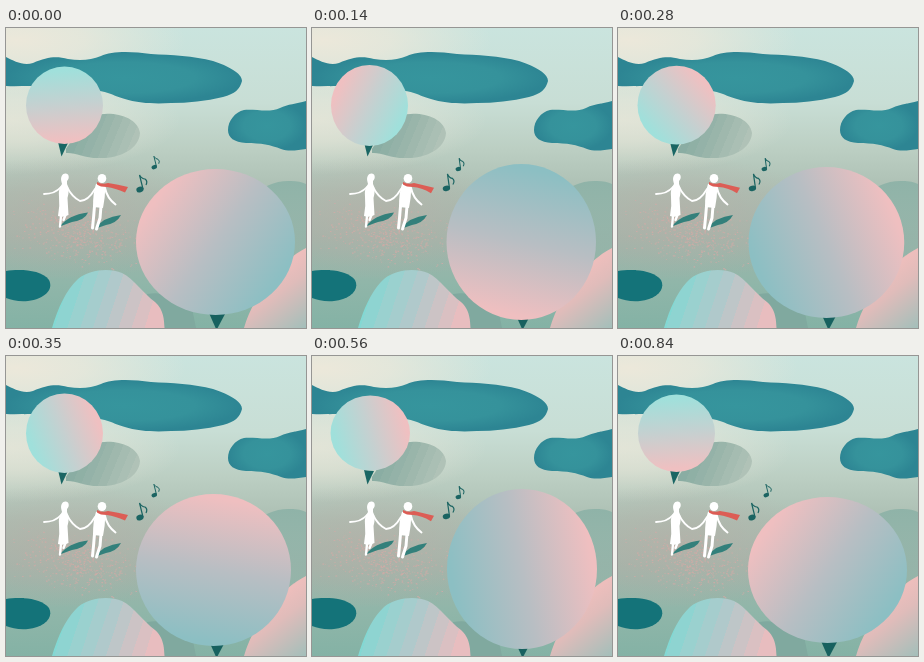
An HTML page that plays this animation: 300x300 px, repeating every 0.91 s.

```html
<!DOCTYPE html>
<html lang="en">
<head>
<meta charset="utf-8">
<title>Walk among the trees</title>
<style>
html, body { margin: 0; width: 100%; height: 100%; overflow: hidden; background: #b5c9bd; }
svg { display: block; width: 100vw; height: 100vh; }
</style>
</head>
<body>
<svg viewBox="0 0 300 300" preserveAspectRatio="none">
  <defs>
    <linearGradient id="land" x1="0" y1="0" x2="0" y2="1">
      <stop offset="0" stop-color="#cae4de"/>
      <stop offset=".25" stop-color="#c8ded5"/>
      <stop offset=".4" stop-color="#bccfc3"/>
      <stop offset=".55" stop-color="#abbeb2"/>
      <stop offset=".7" stop-color="#a0b5aa"/>
      <stop offset=".85" stop-color="#90b6a9"/>
      <stop offset="1" stop-color="#84b2a5"/>
    </linearGradient>
    <radialGradient id="cream">
      <stop offset="0" stop-color="#ece8da"/>
      <stop offset=".4" stop-color="#ece8da" stop-opacity=".75"/>
      <stop offset="1" stop-color="#ece8da" stop-opacity="0"/>
    </radialGradient>
    <radialGradient id="blush">
      <stop offset="0" stop-color="#b9aea6" stop-opacity=".65"/>
      <stop offset="1" stop-color="#b9aea6" stop-opacity="0"/>
    </radialGradient>
    <radialGradient id="lake">
      <stop offset="0" stop-color="#36959d"/>
      <stop offset=".6" stop-color="#35929b"/>
      <stop offset="1" stop-color="#2d8593"/>
    </radialGradient>
    <linearGradient id="hill" x1="0" y1="0" x2="0" y2="1">
      <stop offset="0" stop-color="#8fb3a8"/>
      <stop offset="1" stop-color="#8fb3a8" stop-opacity="0"/>
    </linearGradient>
    <linearGradient id="shade" x1="0" y1=".35" x2="1" y2=".6"></linearGradient>
    <linearGradient id="front" x1="0" y1=".45" x2="1" y2=".62"></linearGradient>
    <linearGradient id="side" gradientUnits="userSpaceOnUse" x1="262" y1="250" x2="300" y2="300">
      <stop offset="0" stop-color="#edbebc"/>
      <stop offset=".3" stop-color="#e0bcba"/>
      <stop offset="1" stop-color="#a3bfba"/>
    </linearGradient>
    <linearGradient id="bigFill">
      <stop offset=".03" stop-color="#8cbfc3"/>
      <stop offset=".5" stop-color="#b8bec3"/>
      <stop offset=".97" stop-color="#efbfc0"/>
    </linearGradient>
    <linearGradient id="smallFill">
      <stop offset=".05" stop-color="#a0e0db"/>
      <stop offset=".5" stop-color="#c6d0d0"/>
      <stop offset=".95" stop-color="#efc0c1"/>
    </linearGradient>
  </defs>

  <rect width="300" height="300" fill="url(#land)"/>
  <ellipse cx="10" cy="12" rx="170" ry="55" fill="url(#cream)"/>
  <ellipse cx="5" cy="92" rx="170" ry="55" fill="url(#cream)" opacity=".75"/>
  <ellipse cx="60" cy="190" rx="150" ry="62" fill="url(#blush)"/>
  <path d="M245 300V170Q262 152 285 153Q294 153 300 156V300Z" fill="url(#hill)"/>
  <path id="dots" fill="#d5aaa6" opacity=".75"/>

  <path fill="url(#lake)" d="M0 29C8 33 17 38 27 35C41 29 50 28 62 31C75 33 85 32 95 28C105 23 125 23 145 26C165 27 188 28 207 33C222 38 236 45 236 53C234 61 229 66 217 69C200 73 182 75 165 75C132 77 117 71 105 66C90 60 62 61 42 59C25 57 12 59 0 58Z"/>
  <path fill="url(#lake)" d="M300 73C290 76 282 76 274 80C264 85 250 81 238 82C229 84 222 93 222 102C222 110 228 114 240 115C255 115 265 117 275 121C283 124 292 122 300 121Z"/>
  <path fill="#147379" d="M0 243C12 241 35 241 43 252C48 262 38 271 22 273C13 274 6 272 0 270Z"/>

  <path fill="url(#shade)" d="M60 121C68 110 74 93 88 88C104 82 132 88 134 105C133 122 112 131 92 130C78 130 68 124 60 125Z"/>
  <path fill="#1a6664" d="M52 114L62 115L55.500 128.500Z"/>
  <ellipse id="small" fill="url(#smallFill)"/>

  <g fill="#33807b">
    <path d="M54 198.500Q62 187 82 184.500Q79 192 66 194Q60 196 54 198.500Z"/>
    <path d="M89 201Q97 189 115 187Q111 195 100 197Q94 199 89 201Z"/>
  </g>
  <g fill="#fff" stroke="#fff" stroke-linecap="round" stroke-linejoin="round">
    <path stroke="none" d="M55.500 154C54 148 57 145 60 145.500C63.500 146 63.500 151 61 153L61 156Q64 161 61.500 170L62.500 187Q57 190 52 188Q54 178 53 169Q52 161 56 156Z"/>
    <path fill="none" stroke-width="1.800" d="M55 159Q49 166 38 166M61 159Q66 169 74 173Q82 173 89 161"/>
    <path fill="none" stroke-width="2.400" d="M55 188L54 198.500M59.500 187L57.500 192"/>
    <ellipse stroke="none" cx="96" cy="150.500" rx="4.300" ry="4.500"/>
    <path stroke="none" d="M90 156Q95 154 99.500 158Q99 170 97 180L87 179Q87 164 90 156Z"/>
    <path fill="none" stroke-width="2" d="M99 160Q101 170 109.500 176.500"/>
    <path fill="none" stroke-width="3" d="M88.500 178L87.500 190L86.500 200M95 178L94 190L90.500 201"/>
  </g>
  <path id="scarf" fill="#dc5d55"/>

  <g fill="#1b6462" stroke="#1b6462">
    <g id="noteA"><ellipse cx="-1" cy="5.500" rx="3.700" ry="2.800" transform="rotate(-18 -1 5.500)" stroke="none"/><path fill="none" stroke-width="1.200" d="M2 5L-1.500 -9Q1 -5 4 -5Q7 -3 5 1"/></g>
    <g id="noteB"><ellipse cx="-1" cy="5.500" rx="3.700" ry="2.800" transform="rotate(-18 -1 5.500)" stroke="none"/><path fill="none" stroke-width="1.300" d="M2 5L-1.500 -9Q1 -5 4 -5Q7 -3 5 1"/></g>
  </g>

  <path fill="#80a99f" d="M141 266Q165 262 186 280L190 300H140Z"/>
  <path fill="url(#front)" d="M46 300C52 280 60 262 72 251C84 241 104 240 116 245C128 251 137 265 149 274C158 282 158 292 158.500 300Z"/>
  <path fill="url(#side)" d="M300 220C288 226 276 236 266 249C254 263 243 282 238 300H300Z"/>
  <path fill="#17615f" d="M203 285L219 286L210.500 302Z"/>
  <ellipse id="big" fill="url(#bigFill)"/>
</svg>
<script>
const $ = id => document.getElementById(id);
const STEP = 70, TICKS = 13;

// Rows: tick, gradient angle, left, top, right, bottom
const bigKeys = [
  [0, 146, 130, 141, 289, 287],
  [2, 258, 134.5, 136, 284, 292],
  [3, 325, 131, 140, 287.5, 290],
  [5, 440, 130, 138, 285, 290],
  [8, 732, 135, 133, 285, 293],
  [10, 785, 133, 137, 285, 290.5],
  [12, 866, 130, 141, 289, 287]
];
const smallKeys = [
  [0, 273, 20, 38.5, 97, 116],
  [2, 152, 19, 37, 96, 118],
  [3, 62, 19, 38, 98.5, 116],
  [5, 22, 20, 37.5, 97, 117],
  [8, -345, 18.5, 39.5, 98, 114.5],
  [10, -385, 20.5, 38, 98, 117],
  [12, -447, 20, 38.5, 97, 116]
];

function sample(keys, tick) {
  const i = Math.max(1, keys.findIndex(k => k[0] >= tick));
  const a = keys[i - 1], b = keys[i];
  const u = (tick - a[0]) / (b[0] - a[0]);
  return a.map((v, j) => v + (b[j] - v) * u);
}

function set(el, attrs) {
  for (const k in attrs) el.setAttribute(k, attrs[k]);
}

function crown(name, keys, tick) {
  const [, angle, l, t, r, b] = sample(keys, tick);
  set($(name), { cx: (l + r) / 2, cy: (t + b) / 2, rx: (r - l) / 2, ry: (b - t) / 2 });
  $(name + 'Fill').setAttribute('gradientTransform', `rotate(${-angle} .5 .5)`);
}

// Soft stripes: each colour holds for one band
function bands(id, from, mid, to, n) {
  const mix = (a, b, u) => a.map((v, i) => Math.round(v + (b[i] - v) * u));
  let out = '';
  for (let i = 0; i < n; i++) {
    const u = i / (n - 1) * 2;
    const c = `rgb(${u < 1 ? mix(from, mid, u) : mix(mid, to, u - 1)})`;
    out += `<stop offset="${i / n}" stop-color="${c}"/><stop offset="${(i + 1) / n}" stop-color="${c}"/>`;
  }
  $(id).innerHTML = out;
}

function scatter() {
  let seed = 11, d = '';
  const rnd = () => (seed = seed * 16807 % 2147483647) / 2147483647;
  for (let i = 0; i < 480; i++) {
    const x = 74 + (rnd() + rnd() - 1) * 68;
    const y = 207 + (rnd() + rnd() - 1) * 32 + (x - 74) * .12;
    const s = .6 + rnd() * .6;
    d += `M${x.toFixed(1)} ${y.toFixed(1)}h${(s * 1.4).toFixed(1)}v${s.toFixed(1)}h${(-s * 1.4).toFixed(1)}z`;
  }
  $('dots').setAttribute('d', d);
}

function draw(ms) {
  const tick = Math.floor(ms / STEP) % TICKS;
  crown('big', bigKeys, tick);
  crown('small', smallKeys, tick);

  const sway = (tick >= 2 && tick <= 4) || (tick >= 7 && tick <= 9) ? 1 : 0;
  $('noteA').setAttribute('transform', `translate(${135 + sway} ${156 - sway}) rotate(${sway * 6})`);
  $('noteB').setAttribute('transform', `translate(${149 - sway * 1.5} ${135 + sway * 2}) rotate(${sway * 6}) scale(.75)`);
  const y = sway * .8;
  $('scarf').setAttribute('d', `M91 154Q96 157 102 155Q112 ${156.5 + y} 122 ${159 + y}L119 ${164.5 + y}Q109 ${160 - y} 101 159Q94 159 91 156.5Z`);
}

bands('shade', [133, 170, 160], [153, 181, 170], [176, 194, 183], 9);
bands('front', [131, 216, 211], [176, 201, 203], [232, 189, 191], 9);
scatter();

const start = performance.now();
function loop() {
  draw(performance.now() - start);
  requestAnimationFrame(loop);
}
draw(0);
requestAnimationFrame(loop);
</script>
</body>
</html>
```
